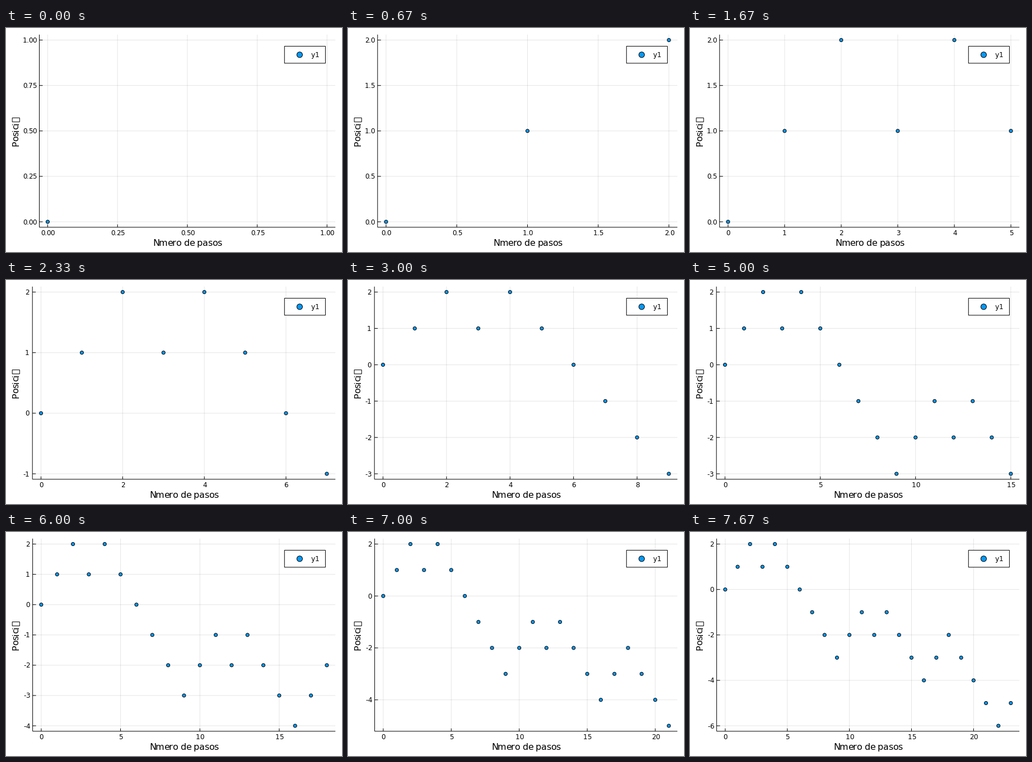
These frames come from a looping animation (600x400 px, 8 s). A matplotlib script:

```python
import itertools
import math

import matplotlib.pyplot as plt
from matplotlib.animation import ArtistAnimation
from matplotlib.collections import LineCollection
from matplotlib.patches import Circle, Rectangle
from matplotlib.text import Text
from matplotlib.textpath import text_to_path

WIDTH, HEIGHT, DPI = 600, 400, 100
STAGES, LOOP_MS, TICK_MS = 24, 8000, 50
PX = 72 / DPI                      # points per pixel
TOP, BOTTOM, RIGHT = 11.8, 355.8, 588.2
PAD = 0.03
BLUE = "#009AFA"
TICK_SIZE, TITLE_SIZE = 12, 16     # pixels
STEPS = "++-+---" "--++-+--" "-++----+"
WALK = list(itertools.accumulate((1 if s == "+" else -1 for s in STEPS), initial=0))

plt.rcParams["font.family"] = "DejaVu Sans"
fig = plt.figure(figsize=(WIDTH / DPI, HEIGHT / DPI), dpi=DPI, facecolor="white")
ax = fig.add_axes([0, 0, 1, 1])
ax.set(xlim=(0, WIDTH), ylim=(HEIGHT, 0))
ax.axis("off")


def nice_ticks(lo, hi):
    """Pick the best scoring round step; return tick values and decimals."""
    pad = PAD * (hi - lo)
    lo, hi = lo - pad, hi + pad
    best = None
    niceness = ((1, 1.0), (5, 0.9), (2.5, 0.5), (2, 0.7), (3, 0.2))
    for (base, nice), power in itertools.product(niceness, (0.1, 1, 10)):
        step = base * power
        first, last = math.ceil(lo / step), math.floor(hi / step)
        count = last - first + 1
        if not 4 <= count <= 8:
            continue
        score = (0.25 * (1 - abs(count - 5) / 5) + 0.25 * nice
                 + 0.5 * (hi - lo) / ((count - 1) * step))
        if best is None or score > best[0] + 1e-9:
            best = score, step, first, last
    _, step, first, last = best
    decimals = len(f"{step:g}".partition(".")[2])
    return [i * step for i in range(first, last + 1)], decimals


def scale(lo, hi, start, end):
    """Map data to pixels, leaving the padding at both ends."""
    unit = (end - start) / ((hi - lo) * (1 + 2 * PAD))
    return lambda v: start + (v - lo + PAD * (hi - lo)) * unit


def advance(char, size):
    """Pen advance of one character, cut to whole pixels."""
    font = Text(size=size).get_fontproperties()
    wide, narrow = (text_to_path.get_text_width_height_descent(s, font, False)[0]
                    for s in (f"|{char}|", "||"))
    return math.floor(wide - narrow + 1e-6)


def write(x, y, text, size=TICK_SIZE, align=0.0, rotation=0):
    """Set text on whole-pixel advances; align is the share left of x."""
    advances = [advance(c, size) for c in text]
    pen = -align * sum(advances)
    x, y = (round(x + pen), round(y)) if not rotation else (round(x), round(y - pen))
    artists = []
    for char, step in zip(text, advances):
        if char != " ":
            artists.append(ax.text(x, y, char, size=size * PX, rotation=rotation,
                                   rotation_mode="anchor", ha="left",
                                   va="baseline", zorder=6))
        if rotation:
            y -= step
        else:
            x += step
    return artists


def lines(segments, alpha=1.0, z=1):
    return ax.add_collection(
        LineCollection(segments, colors="black", linewidths=PX, alpha=alpha,
                       snap=False, zorder=z), autolim=False)


def dot(x, y, diameter, z=4):
    return ax.add_patch(Circle((x, y), diameter / 2, fc=BLUE, ec="black",
                               lw=PX, snap=False, zorder=z))


def box(x, y, w, h, fill="none"):
    ax.add_patch(Rectangle((x, y), w, h, fc=fill, ec="black", lw=PX,
                           snap=False, zorder=5))


def draw_fixed_parts():
    box(497.3, 32.6, 73.1, 30.3, "white")
    dot(524.4, 47.8, 10, 6)
    write(545, 52, "y1")
    write(22, 211, "Posici", TITLE_SIZE, rotation=90)
    box(11.2, 160.5, 13.1, 7.2)    # missing glyph


def build(n):
    """All artists of the plot after n steps of the walk."""
    walk = WALK[:n + 1]
    x_hi, y_lo, y_hi = max(n, 1), min(walk), max(1, *walk, 0)
    x_ticks, x_dec = nice_ticks(0, x_hi)
    y_ticks, y_dec = nice_ticks(y_lo, y_hi)
    left = (47.2, 52.8, 59.5)[y_dec] + (0.4 if y_lo <= -4 else 0)
    to_x = scale(0, x_hi, left, RIGHT)
    to_y = scale(y_lo, y_hi, BOTTOM, TOP)

    scene, grid = [], []
    axes = [[(left, TOP), (left, BOTTOM)], [(left, BOTTOM), (RIGHT, BOTTOM)]]
    for v in x_ticks:
        x = to_x(v)
        grid.append([(x, TOP), (x, BOTTOM)])
        axes.append([(x, BOTTOM), (x, BOTTOM - 5)])
        scene += write(x, 370, f"{v:.{x_dec}f}", align=0.5)
    for v in y_ticks:
        y = to_y(v)
        grid.append([(left, y), (RIGHT, y)])
        axes.append([(left, y), (left + 6, y)])
        scene += write(left - 6, y + 4.5, f"{v:.{y_dec}f}", align=1)
    scene += [lines(grid, 0.1), lines(axes, z=2)]
    scene += [dot(to_x(i), to_y(v), 6) for i, v in enumerate(walk)]
    scene += write((left + RIGHT) / 2, 389, "Nmero de pasos", TITLE_SIZE, 0.5)
    return scene


draw_fixed_parts()
scenes = [build(n) for n in range(STAGES)]
# Each short tick shows the stage reached by its end.
timeline = [scenes[(end - 1) * STAGES // LOOP_MS]
            for end in range(TICK_MS, LOOP_MS + 1, TICK_MS)]
anim = ArtistAnimation(fig, timeline, interval=TICK_MS, repeat=True, repeat_delay=0)
plt.show()
```
